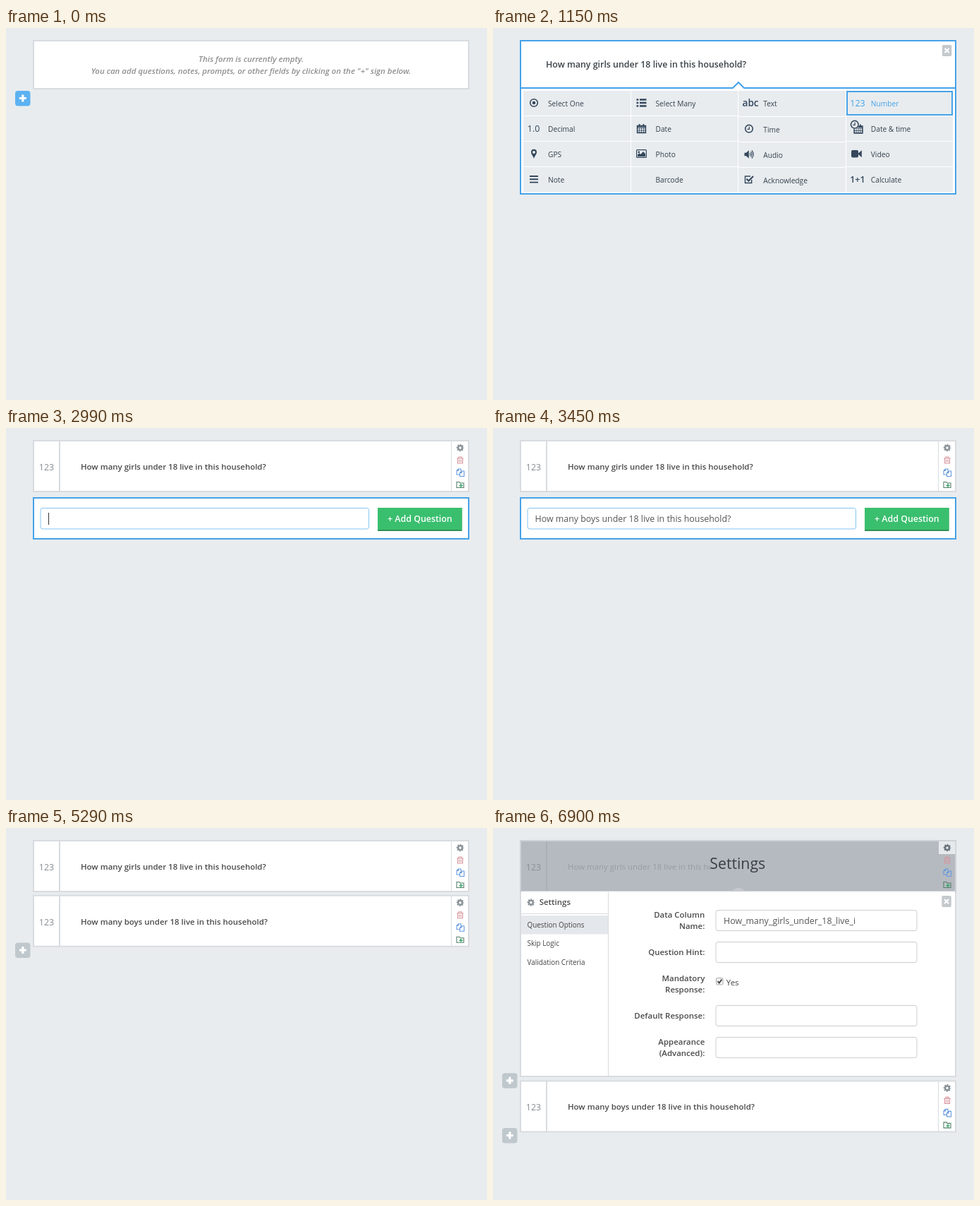
Animation, 682 px wide and 527 px high, one loop 8000 ms. Source, as an HTML page:

```html
<!DOCTYPE html>
<html lang="en">
<head>
<meta charset="utf-8">
<title>Form builder</title>
<style>
html, body { margin: 0; width: 100%; height: 100%; overflow: hidden; background: #e8ecef; }
svg { display: block; width: 100%; height: 100%; font-family: "Open Sans", "Noto Sans", sans-serif; }

.scene { visibility: hidden; animation: show 8s step-end infinite; animation-delay: calc(var(--n) * 1150ms - 8000ms); }
.scene.last { animation-name: show-last; }
@keyframes show { 0% { visibility: visible; } 14.375%, 100% { visibility: hidden; } }
@keyframes show-last { 0% { visibility: visible; } 13.75%, 100% { visibility: hidden; } }

.card { fill: #fff; stroke: #d8dce0; stroke-width: 2; }
.active { fill: #fff; stroke: #45a2e8; stroke-width: 2; }
.rule { fill: none; stroke: #d8dce0; }
.body { font-size: 11.46px; font-weight: 600; fill: #4a4a4a; }
.hint { font-size: 11.46px; font-weight: 600; font-style: italic; fill: #8f8f8f; text-anchor: middle; }
.num { font-size: 12.4px; fill: #878f95; }
.big { font-size: 12.4px; font-weight: 600; fill: #3c4248; }
.entry { font-size: 12.4px; fill: #555; }
.menu { font-size: 10.2px; fill: #34404c; }
.side { font-size: 9.9px; fill: #444; }
.label { text-anchor: end; }
.head { font-size: 21.3px; fill: #3b3e42; }
.field { fill: #fff; stroke: #cbcdcf; }
.line { fill: none; stroke: #34475c; stroke-width: 1.6; }
.solid { fill: #34475c; }
.blue { fill: #45a2e8; }
.grey { color: #bfc8cd; }
</style>
</head>
<body>
<svg viewBox="0 0 682 527" preserveAspectRatio="none">
<defs>
  <g id="plus">
    <rect width="21.5" height="21.5" rx="4" fill="currentColor"/>
    <path d="M5.8 10.5H15.8M10.8 5.5V15.5" stroke="#fff" stroke-width="3.2"/>
  </g>
  <g id="close">
    <rect width="13.5" height="16" rx="2" fill="#c4c9cc"/>
    <path d="M3.7 5L9.8 11M9.8 5L3.7 11" stroke="#fff" stroke-width="2"/>
  </g>
  <g id="gear" fill="none" stroke="currentColor">
    <circle r="2.9" stroke-width="2.4"/>
    <circle r="4.5" stroke-width="1.7" stroke-dasharray="1.9 1.634" stroke-dashoffset=".95"/>
  </g>
  <g id="tools" fill="none">
    <g stroke="#d8959d">
      <path d="M639.3 43H648.7M642 42.6V41H646V42.6M640.5 43.5V50H647.5V43.5" stroke-width="1.1"/>
      <path d="M642.4 44.8V48.5M644 44.8V48.5M645.6 44.8V48.5" stroke-width=".8"/>
    </g>
    <path d="M643.5 66H639V60.5L641.5 58H645V61M641.5 58V60.5H639M643.5 68.5V63.5L646 61H649.5V68.5ZM646 61V63.5H643.5" stroke="#6599de" stroke-width="1.1"/>
    <path d="M639 84.5V76.5H643L644 78H649V84.5Z" stroke="#54806a" stroke-width="1.1"/>
    <path d="M645 79V84M642.5 81.5H647.5" stroke="#35a566" stroke-width="1.4"/>
  </g>
  <g id="row">
    <rect class="card" x="39" y="18" width="617" height="72"/>
    <path class="rule" d="M76 18V90" stroke-width="2"/>
    <path class="rule" d="M631.5 18V90"/>
    <text class="num" x="46.8" y="60">123</text>
    <use href="#gear" x="644" y="28" color="#8a9399"/>
    <use href="#tools"/>
  </g>
  <g id="girls">
    <use href="#row"/>
    <text class="body" x="106" y="59">How many girls under 18 live in this household?</text>
  </g>
  <g id="boys">
    <use href="#row" y="77.7"/>
    <text class="body" x="106" y="136.8">How many boys under 18 live in this household?</text>
  </g>
  <g id="adder">
    <rect class="active" x="39" y="99" width="617" height="58"/>
    <rect x="49" y="113.5" width="465.5" height="29.5" rx="3" fill="#fff" stroke="#83c5f2"/>
    <rect x="527" y="113" width="119.5" height="33" fill="#2c9153"/>
    <rect x="527" y="113" width="119.5" height="31" fill="#3abf6e"/>
    <text x="541" y="133.2" font-size="12.4" font-weight="600" fill="#fff">+ Add Question</text>
  </g>
  <g id="shaded">
    <rect x="39" y="18" width="617" height="72" fill="#b5bac0" stroke="#cdd1d6" stroke-width="2"/>
    <path d="M76 19V89" stroke="#a6abb1" stroke-width="1.5"/>
    <text class="num" x="46.8" y="60">123</text>
    <text x="106" y="59" font-size="11.46" fill="#979ca2">How many girls under 18 live in this household?</text>
    <rect x="309" y="36" width="79" height="34" fill="#b5bac0"/>
    <text class="head" x="307.3" y="58">Settings</text>
    <use href="#tools"/>
  </g>
  <g id="calendar">
    <path class="line" d="M.6 2.5H12.4V12.4H.6Z" stroke-width="1.2"/>
    <path class="line" d="M.6 5.6H12.4M.6 9H12.4M3.6 5V12.4M6.5 5V12.4M9.4 5V12.4" style="stroke-width:.8"/>
    <path class="line" d="M.6 3.6H12.4M3.6 0V4M9.4 0V4" style="stroke-width:1.8"/>
  </g>
  <g id="clock" class="line">
    <circle r="5.3"/>
    <path d="M.3 -3V.6H-2.5" style="stroke-width:1.2"/>
  </g>
</defs>

<g class="scene" style="--n:0">
  <rect class="card" x="39" y="18" width="617" height="68"/>
  <text class="hint" x="347.5" y="48.3">This form is currently empty.</text>
  <text class="hint" x="347.5" y="64.5">You can add questions, notes, prompts, or other fields by clicking on the "+" sign below.</text>
  <use href="#plus" x="13" y="89" color="#5cb1f1"/>
</g>

<g class="scene" style="--n:1">
  <rect class="active" x="39" y="18" width="617" height="217"/>
  <text class="big" x="75" y="56.3">How many girls under 18 live in this household?</text>
  <use href="#close" x="636.8" y="24"/>
  <rect x="43" y="89" width="609" height="143.5" fill="#e8ecef"/>
  <path d="M195.5 88V233M347.5 88V233M500.5 88V233M43 124.5H347M348 125.5H500M501 124.5H652M43 160.5H347M348 161.5H500M501 160.5H652M43 196.5H347M348 197.5H500M501 196.5H652" stroke="#fff"/>
  <path d="M39 85H340L348 77L356 85H656" fill="#fff" stroke="#45a2e8" stroke-width="2"/>
  <rect x="502" y="90" width="149" height="33" fill="none" stroke="#45a2e8" stroke-width="2"/>

  <g class="menu">
    <text x="78" y="110.6">Select One</text>
    <text x="78" y="146.7">Decimal</text>
    <text x="78" y="182.8">GPS</text>
    <text x="78" y="219">Note</text>
    <text x="230.5" y="110.6">Select Many</text>
    <text x="230.5" y="146.7">Date</text>
    <text x="230.5" y="182.8">Photo</text>
    <text x="230.5" y="219">Barcode</text>
    <text x="383.3" y="111.4">Text</text>
    <text x="383.3" y="147.5">Time</text>
    <text x="383.3" y="183.7">Audio</text>
    <text x="383.3" y="219.9">Acknowledge</text>
    <text class="blue" x="535.8" y="110.6">Number</text>
    <text x="535.8" y="146.7">Date &amp; time</text>
    <text x="535.8" y="182.8">Video</text>
    <text x="535.8" y="219">Calculate</text>
  </g>

  <g class="solid" font-size="12.4">
    <text x="48.8" y="147">1.0</text>
    <text x="353.5" y="111.2" font-size="13.6" font-weight="600">abc</text>
    <text class="blue" x="506.3" y="110.6">123</text>
    <text x="506.3" y="219.3" font-weight="600">1+1</text>
  </g>

  <circle class="line" cx="58" cy="106" r="5.3"/>
  <circle class="solid" cx="58" cy="106" r="2.3"/>
  <path class="line" d="M203.5 101.5H206.3M208 101.5H217.5M203.5 106H206.3M208 106H217.5M203.5 110.5H206.3M208 110.5H217.5" style="stroke-width:2.4"/>
  <use href="#calendar" x="204" y="136"/>
  <use href="#clock" x="363" y="142.7"/>
  <use href="#calendar" x="511.5" y="136.5"/>
  <circle cx="512.8" cy="136.7" r="6.3" fill="#e8ecef"/>
  <use href="#clock" x="512.8" y="136.7"/>
  <path class="solid" fill-rule="evenodd" d="M58 185C57 181.5 54 179 54 175.8A4 4 0 0 1 62 175.8C62 179 59 181.5 58 185ZM58 174A2 2 0 1 0 58 178A2 2 0 1 0 58 174Z"/>
  <rect class="line" x="203.6" y="172.6" width="13.8" height="10.8" rx="1" style="stroke-width:1.2"/>
  <path class="solid" d="M205 182V179.5L207.5 177.2L209.3 179L213 175L216 178.3V182Z"/>
  <circle class="solid" cx="206.8" cy="175.8" r="1.4"/>
  <path class="solid" d="M356.5 176.8H359L362.8 173.3V184.7L359 181.2H356.5Z"/>
  <path class="line" d="M364.2 177Q366 179 364.2 181M365.6 175.2Q368.6 179 365.6 182.8M367 173.3Q371.6 179 367 184.7" style="stroke-width:1.1"/>
  <rect class="solid" x="508" y="173" width="10" height="10.5" rx="2"/>
  <path class="solid" d="M518 177.5L522.8 173.2V183.3L518 179Z"/>
  <path class="line" d="M52 210H64M52 214.3H64M52 218.6H64" style="stroke-width:1.9"/>
  <path class="line" d="M366.7 215V219.5H357.5V210H365" style="stroke-width:1.4"/>
  <path class="line" d="M359.5 213.7L362.5 216.6L369 210" style="stroke-width:2.1"/>
</g>

<g class="scene" style="--n:2">
  <use href="#girls"/>
  <use href="#adder"/>
  <path d="M60.5 120V137" stroke="#333"/>
</g>

<g class="scene" style="--n:3">
  <use href="#girls"/>
  <use href="#adder"/>
  <text class="entry" x="59.5" y="133.2">How many boys under 18 live in this household?</text>
</g>

<g class="scene" style="--n:4">
  <use href="#girls"/>
  <use href="#boys"/>
  <use class="grey" href="#plus" x="13" y="162.5"/>
</g>

<g class="scene" style="--n:5">
  <use href="#shaded"/>
  <use href="#gear" x="644" y="28" color="#fff"/>
  <use href="#boys"/>
  <use class="grey" href="#plus" x="13" y="85"/>
  <use class="grey" href="#plus" x="13" y="162.5"/>
</g>

<g class="scene last" style="--n:6">
  <rect class="card" x="39" y="18" width="617" height="334"/>
  <use href="#shaded"/>
  <rect x="40" y="90" width="615" height="2" fill="#fff"/>
  <path d="M338 90Q348 80 358 90Z" fill="#c6cace"/>
  <rect x="632" y="19" width="23.5" height="18" fill="#e6e9ec"/>
  <use href="#gear" x="644" y="28" color="#69737b"/>
  <path class="rule" d="M163.5 91V351M40 121.5H163"/>
  <rect x="40" y="124" width="123" height="26.5" fill="#e4e7eb"/>
  <use href="#gear" x="53.8" y="105.5" color="#8a9399"/>
  <text class="body" x="65.7" y="109.4">Settings</text>
  <g class="side">
    <text x="48.5" y="140.6">Question Options</text>
    <text x="48.5" y="167">Skip Logic</text>
    <text x="48.5" y="193.6">Validation Criteria</text>
  </g>
  <use href="#close" x="636.3" y="96"/>

  <g class="body label">
    <text x="300.3" y="127.3">Data Column</text>
    <text x="300.3" y="143.3">Name:</text>
    <text x="300.3" y="180.3">Question Hint:</text>
    <text x="300.3" y="217.3">Mandatory</text>
    <text x="300.3" y="233.3">Response:</text>
    <text x="300.3" y="270.4">Default Response:</text>
    <text x="300.3" y="307.4">Appearance</text>
    <text x="300.3" y="323.4">(Advanced):</text>
  </g>
  <g class="field">
    <rect x="316" y="116.5" width="285" height="29" rx="3"/>
    <rect x="316" y="161.5" width="285" height="29" rx="3"/>
    <rect x="316" y="251.5" width="285" height="29" rx="3"/>
    <rect x="316" y="296.5" width="285" height="29" rx="3"/>
  </g>
  <text class="entry" x="327" y="136">How_many_girls_under_18_live_i</text>
  <rect x="316.5" y="212.5" width="9.5" height="9.5" rx="1.5" fill="#f1f1f1" stroke="#aaa"/>
  <path d="M318.5 217.2L320.7 219.5L324.4 214.5" fill="none" stroke="#444" stroke-width="1.9"/>
  <text x="330.8" y="223.4" font-size="11.46" fill="#444">Yes</text>

  <use href="#boys" y="262.7"/>
  <use class="grey" href="#plus" x="13" y="347.3"/>
  <use class="grey" href="#plus" x="13" y="425"/>
</g>
</svg>
</body>
</html>
```
